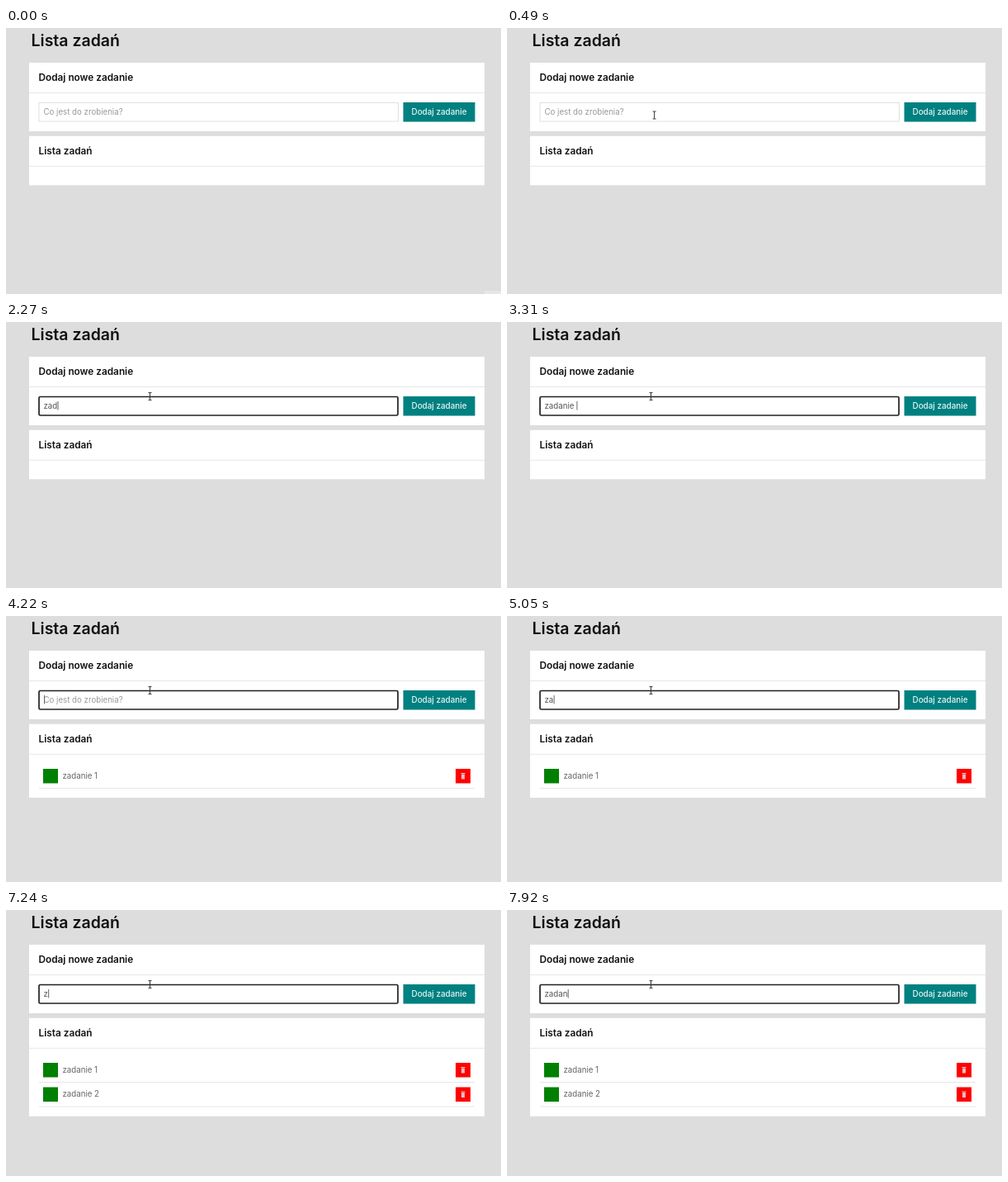
These frames come from a looping animation (600 by 322 pixels, 8 s). An HTML page with a canvas:

```html
<!DOCTYPE html>
<html lang="pl">
<head>
<meta charset="utf-8">
<title>Lista zadań</title>
<style>
  html, body { margin: 0; width: 100%; height: 100%; overflow: hidden; background: #ddd; }
  canvas { display: block; width: 600px; height: 322px; }
</style>
</head>
<body>
<canvas></canvas>
<script>
const LOOP = 8000;
const FOCUS = 690;
const ADDED = [4220, 6630];
// Each session lists the time of every key press, in typing order.
const SESSIONS = [
  { text: 'zadanie 1', keys: [1720, 1930, 2270, 2810, 2935, 3060, 3185, 3310, 3730], end: ADDED[0] },
  { text: 'zadanie 2', keys: [4830, 5050, 5240, 5430, 5620, 5800, 5880, 6000, 6270], end: ADDED[1] },
  { text: 'zadanie 3', keys: [7240, 7390, 7570, 7750, 7920], end: LOOP }
];

const canvas = document.querySelector('canvas');
const ctx = canvas.getContext('2d');
const scale = window.devicePixelRatio || 1;
canvas.width = 600 * scale;
canvas.height = 322 * scale;

function rect(x, y, w, h, color) {
  ctx.fillStyle = color;
  ctx.fillRect(x, y, w, h);
}

function label(text, x, y, size, weight, color) {
  ctx.font = `${weight} ${size}px Inter, sans-serif`;
  ctx.fillStyle = color;
  ctx.fillText(text, x, y);
  return x + ctx.measureText(text).width;
}

function card(title, y, height) {
  rect(28, y, 552, height, '#fff');
  rect(28, y + 36, 552, 1, '#e6e6e6');
  label(title, 39.5, y + 22.2, 11.8, 600, '#111');
}

function task(text, y, dark) {
  rect(45, y, 18, 17.5, dark ? '#006600' : '#008000');
  label(text, 68.5, y + 11.7, 9.7, 400, '#666');
  rect(545, y, 18, 17.5, dark ? '#e60000' : '#ff0000');
  rect(551.5, y + 5, 5, 1, '#eecaca');
  rect(552, y + 6.5, 4, 6, '#e3bcbc');
  rect(40, y + 23, 528, 1, '#e6e6e6');
}

function input(t) {
  if (t < FOCUS) {
    ctx.strokeStyle = '#e0e0e0';
    ctx.lineWidth = 1;
    ctx.strokeRect(40, 90.5, 435.5, 22.5);
  } else {
    ctx.strokeStyle = '#222';
    ctx.lineWidth = 1.7;
    ctx.beginPath();
    ctx.roundRect(40, 90.5, 435, 22.5, 1.5);
    ctx.stroke();
  }

  const session = SESSIONS.find(s => t < s.end);
  const count = session.keys.filter(time => time <= t).length;
  let caretX = 46;
  if (count) caretX = label(session.text.slice(0, count), 45.5, 104.5, 9.7, 400, '#555') + 0.3;
  else label('Co jest do zrobienia?', 45.5, 104.5, 9.7, 400, '#999');

  const blinkedOff = t < 1510 || (t >= 3940 && t < 4220) || (t >= 6770 && t < 7240);
  if (!blinkedOff) rect(caretX, 96, 1, 10.5, '#666');
}

function arrow(x, y) {
  const points = [[0, 0], [0, 11], [2.6, 8.6], [4.3, 12.3], [6, 11.5], [4.4, 8], [7.8, 8]];
  ctx.beginPath();
  points.forEach(([dx, dy]) => ctx.lineTo(x + dx, y + dy));
  ctx.closePath();
  ctx.fillStyle = '#fff';
  ctx.fill();
  ctx.strokeStyle = '#222';
  ctx.lineWidth = 0.8;
  ctx.stroke();
}

function textCursor(x, y) {
  rect(x - 0.5, y - 4.5, 1, 9, '#333');
  for (const end of [-5, 4]) rect(x - 2, y + end, 4, 1, '#444');
}

function pointer(t) {
  if (t < 70) return;
  const step = Math.floor((t - 70) / 77) * 77;
  const progress = Math.min(1, step / 540);
  const rest = (1 - progress) ** 2;
  const x = 174.5 + 50 * rest, y = 90 + 188 * rest;
  if (y < 113) textCursor(x, y);
  else arrow(x, y);
}

function draw(t) {
  ctx.setTransform(scale, 0, 0, scale, 0, 0);
  rect(0, 0, 600, 322, '#ddd');
  if (t < 70) rect(580, 318, 20, 4, '#e6e6e6');

  label('Lista zadań', 30.5, 21.5, 19.5, 600, '#111');
  card('Dodaj nowe zadanie', 42, 83);
  input(t);
  rect(481.5, 90, 87, 23.5, '#008080');
  label('Dodaj zadanie', 491.5, 104.7, 9.9, 500, '#e8f4f4');

  const tasks = ADDED.filter(time => time <= t).length;
  card('Lista zadań', 130.8, 59.5 + 29.7 * tasks);
  const dark = t >= 6270 && t < 6630;
  for (let i = 0; i < tasks; i++) task(SESSIONS[i].text, 185 + 29.5 * i, dark);
  pointer(t);
}

const start = performance.now();
function frame() {
  draw((performance.now() - start) % LOOP);
  requestAnimationFrame(frame);
}
frame();
</script>
</body>
</html>
```
